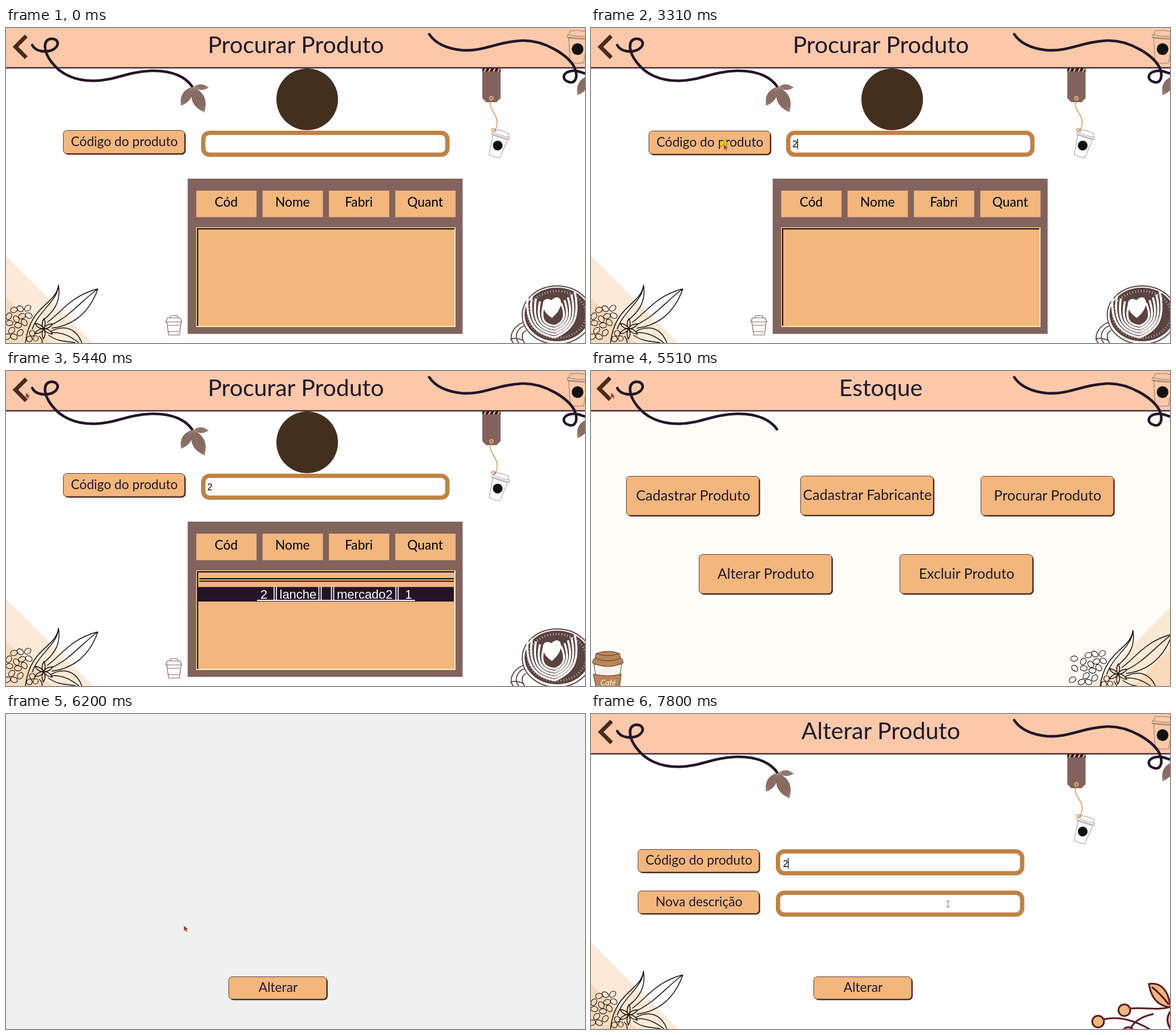
These frames come from a looping animation (1015 px wide and 552 px high, 8 s). An HTML page:

```html
<!DOCTYPE html>
<html lang="pt">
<head>
<meta charset="utf-8">
<title>Procurar Produto</title>
<style>
html, body { margin: 0; width: 100%; height: 100%; overflow: hidden; background: #fff; }
svg { display: block; width: 100%; height: 100%; }
text { font-family: Lato, "Open Sans", sans-serif; fill: #231829; }
.mid { text-anchor: middle; }
.arial, .arial text { font-family: "Liberation Sans", Arial, sans-serif; }
.ink { fill: none; stroke: #231527; stroke-linecap: round; stroke-linejoin: round; }
.thin { fill: none; stroke: #4a3a36; stroke-width: .6; stroke-linejoin: round; }
</style>
</head>
<body>
<svg id="stage" viewBox="0 0 1015 552"></svg>
<script>
const FACE = '#f3b77d', BROWN = '#82635d', DARK = '#4a2c24';
const rect = (x, y, w, h, fill, more = '') =>
  `<rect x="${x}" y="${y}" width="${w}" height="${h}" fill="${fill}" ${more}/>`;
const path = (d, more = '') => `<path d="${d}" ${more}/>`;
const circle = (x, y, r, more = '') => `<circle cx="${x}" cy="${y}" r="${r}" ${more}/>`;
const text = (x, y, size, s, more = 'class="mid"') =>
  `<text x="${x}" y="${y}" font-size="${size}" ${more}>${s}</text>`;
const group = (id, body, more = '') => `<g id="${id}" ${more}>${body}</g>`;

const button = (x, y, w, h, label, size = 22.7, id = '') => group(id,
  rect(x + 2, y + 2, w - 2, h - 2, DARK, 'rx="7"') +
  rect(x + .5, y + .5, w - 2.5, h - 2.5, FACE, `rx="6" stroke="${DARK}" stroke-width=".9"`) +
  text(x + w / 2, y + h / 2 - 1 + size * .33, size, label));
const entry = (x, y) =>
  rect(x + 3.8, y + 3.8, 428, 38.2, '#fff', 'rx="11" stroke="#c08244" stroke-width="7.6"');
const field = (id, more = '') => group(id,
  text(353, 209, 16, '2', `id="${id}Text" style="fill:#000"`) +
  rect(353, 194, 1.3, 18, '#000', `id="${id}Caret"`), 'class="arial" ' + more);

// Paper cup outline around its black round label
const cup = (x, y, scale, turn) =>
  `<g transform="translate(${x} ${y}) rotate(${turn}) scale(${scale})" class="thin">` +
  path('M-17,-20 L-12,24 Q0,27 12,24 L17,-20Z M-20,-20 Q0,-16 20,-20 L19,-25 Q0,-21 -19,-25Z M-17,-25 L-15,-32 Q0,-35 15,-32 L17,-25') +
  circle(0, 0, 10.5, 'fill="#111" stroke="none"') + '</g>';

const leaf = (x, y, len, wide, turn) => {
  let veins = '';
  for (let k = -.7; k < .8; k += .35)
    veins += path(`M0,0 Q${len / 2},${k * wide * 2} ${len},0`, 'fill="none" stroke="#a89088" stroke-width=".6"');
  return `<g transform="translate(${x} ${y}) rotate(${turn})">` +
    path(`M0,0 Q${len * .5},${-wide * 2} ${len},0 Q${len * .5},${wide * 2} 0,0`, 'fill="#80635b"') + veins + '</g>';
};

const beans = [[5, 505], [14, 494], [25, 492], [38, 491], [6, 517], [18, 510], [28, 505], [40, 504], [10, 530],
  [21, 521], [32, 516], [2, 541], [14, 541], [25, 534], [-11, 500], [-10, 517], [-14, 537]];
let petals = '';
for (let i = 0; i < 6; i++)
  petals += path('M0,0 Q8,-6 18,0 Q8,5 0,0', `fill="#f8d8b8" transform="translate(66 527) rotate(${i * 60 - 88})"`);
const plant = '<g fill="none" stroke="#17100f" stroke-width="1.5" stroke-linejoin="round">' +
  beans.map(([x, y], i) =>
    `<ellipse cx="${x}" cy="${y}" rx="6.2" ry="4.6" stroke-width="1.1" transform="rotate(${i * 47 % 120 - 60} ${x} ${y})"/>`).join('') +
  path('M92,450 C88,486 42,484 34,552 M92,450 C96,476 88,494 64,513 M92,450 C92,478 56,496 46,528') +
  path('M161,457 C112,470 98,498 72,516 M161,457 C146,500 116,522 80,526 M161,457 C130,480 112,506 76,522') +
  path('M78,532 C104,518 124,528 133,552 M74,538 C94,552 108,548 122,552 M78,534 C100,532 116,542 128,552 M58,540 Q66,546 62,556') +
  petals + circle(46, 535, 5, 'stroke-width="1.2"') + circle(41, 545, 5, 'stroke-width="1.2"') +
  circle(52, 544, 4.5, 'stroke-width="1.2"') + '</g>';

const header = group('header',
  rect(0, 0, 1015, 70, '#fbc9aa') + rect(0, 68.6, 1015, 2.3, '#3b2230') + cup(1002, 37, .98, 3) +
  path('M35.5,14 L16.5,33 L35.5,52', 'id="back" fill="none" stroke="#4b2a1a" stroke-width="7"') +
  path('M46,30 C52,42 72,44 84,37 C96,28 90,18 78,19 C64,22 66,42 80,60 C95,80 120,93 155,92.5 C190,92 215,76 255,75 C295,74 316,88 326,102', 'class="ink" stroke-width="4.6"') +
  path('M742,11 C752,26 770,36 800,39 C840,41 860,24 905,22 C945,21 985,48 996,68 C1004,86 998,97 988,95 C974,92 975,79 988,76 C998,73 1006,77 1016,80', 'class="ink" stroke-width="4.6"') +
  text(508, 43.5, 41, '', 'class="mid" id="title"'));

let stripes = '';
for (let x = 837; x < 866; x += 8) stripes += path(`M${x},76 l3,-6 h3 l-3,6Z`, `fill="${FACE}"`);
const decor = group('decor',
  leaf(327, 103, 49, 11, 65) + leaf(326, 103, 38, 8, 120) + leaf(329, 103, 26, 5, 3) + leaf(1020, 84, 38, 8, 118) +
  path('M835,70 H867 V123 L860,130 H842 L835,123Z', `fill="${BROWN}"`) + rect(835, 70, 32, 6, '#2a1a1c') + stripes +
  circle(851, 123, 2.8, `fill="${BROWN}" stroke="${FACE}" stroke-width="1.8"`) +
  path('M850,126 C844,142 862,150 861,167 C860,178 855,183 852,180 C849,175 857,174 859,182', 'fill="none" stroke="#c98545" stroke-width="1.3"') +
  cup(862, 206, .81, 17) +
  path('M0,399 L153,552 H0Z', 'fill="#fcead9"') + path('M0,472 L80,552 H0Z', 'fill="#f9dabb"') + plant);

// Latte seen from above
let foam = '';
for (let i = 2; i < 7; i++)
  foam += path(`M${957 - 7 * i},${494 - 5 * i} C${950 - 7 * i},${506 + 2 * i} ${948 - 3 * i},${512 + 4 * i} 962,${512 + 5 * i} C${972 + 4 * i},${510 + 3 * i} ${970 + 6 * i},${500 + i} ${961 + 6 * i},${492 - 5 * i}`,
    'fill="none" stroke="#fff" stroke-width="3.6"');
const latte = '<g fill="none" stroke="#5a4340" stroke-width="1.8">' +
  path('M906,516 C888,524 880,542 890,553 M908,522 C893,528 891,545 900,553 M912,530 C902,534 904,546 910,553 M884,546 Q892,541 908,548') +
  '<ellipse cx="966" cy="503" rx="61" ry="51" fill="#fff"/>' +
  '<ellipse cx="966" cy="502" rx="56" ry="46" fill="#5a4340"/>' +
  '<ellipse cx="966" cy="502" rx="51" ry="41" stroke="#d9cfcc" stroke-width="4" stroke-dasharray="1 4"/></g>' +
  foam + path('M957,508 C932,492 940,467 956,477 C972,461 984,486 957,508Z', 'fill="#fff"');

const smallCup = path('M282,515 H307 L304,538 H285Z M280,515 L283,508 H305 L308,515Z M287,508 L289,504 H300 L302,508 M284,521 H305 M285,532 H303',
  'fill="none" stroke="#80635c" stroke-width="1.2"');

const heads = ['Cód', 'Nome', 'Fabri', 'Quant'].map((s, i) =>
  rect(333.5 + i * 116.3, 285, 105.7, 46.5, FACE) + text(386 + i * 116.3, 313, 22.7, s, 'class="mid" style="fill:#000"')).join('');
const bars = [469.5, 548, 570, 683].map(x => `M${x + .5},378 v24 M${x + 4.5},378 v24`).join(' ');
const results = group('results',
  path('M339,364 H785 M339,368.3 H785', 'stroke="#000" stroke-width="1.8"') +
  rect(337, 378.5, 448, 25.5, '#231429', 'id="picked"') +
  group('row',
    path(bars, 'stroke="currentColor" stroke-width="1.7"') +
    [[446, '2'], [479.5, 'lanche'], [580, 'mercado2'], [699.5, '1']].map(([x, s]) =>
      text(x, 398.5, 22, s, 'style="fill:currentColor"')).join('') +
    path('M440,402 H717', 'id="under" stroke="currentColor" stroke-width="1.8"'), 'class="arial"'));

const find = group('find',
  circle(528, 125, 54, 'fill="#42301f"') +
  button(100, 179, 215, 43, 'Código do produto', 22.7, 'search') + entry(342, 180) + field('code') +
  rect(318.5, 264, 482, 272, BROWN) + heads +
  rect(333, 349, 455, 175, '#fdeeb4') + path('M333,524 V349 H788 L786,351 H335 V522Z', 'fill="#d9ae80"') +
  rect(335, 351, 451, 171, '#1a1010') + rect(337, 353, 449, 169, FACE) + results + smallCup + latte);

const stock = group('stock',
  path('M1015,415 L878,552 H1015Z', 'fill="#fbe9d4"') + path('M1015,487 L950,552 H1015Z', 'fill="#f9dabb"') +
  `<g transform="translate(858 4)">${plant}</g>` +
  button(61.5, 184, 235, 71, 'Cadastrar Produto', 25) + button(367, 183.5, 235, 71, 'Cadastrar Fabricante', 25) +
  button(683, 184, 235, 71, 'Procurar Produto', 25) + button(189, 321, 235, 71, 'Alterar Produto', 25, 'change') +
  button(541, 321, 235, 71, 'Excluir Produto', 25) +
  '<g stroke="#5b3a28" stroke-width="1">' +
  path('M5,514 L12,556 H46 L54,514Z', 'fill="#f7f3ef"') + path('M4,531 Q30,537 53,531 L50,556 H9Z', 'fill="#b98558"') +
  path('M3,512 Q2,506 7,503 L9,495 Q30,487 50,495 L52,503 Q57,506 56,512 Q30,524 3,512Z', 'fill="#b98558"') +
  path('M7,503 Q30,513 52,503 M9,495 Q30,503 50,495', 'fill="none"') + '</g>' +
  text(30, 551, 14, 'Café', 'class="mid" style="fill:#fff;font-style:italic"'));

const twig = '<g fill="none" stroke="#5a1a22" stroke-width="3" stroke-linecap="round">' +
  path('M899,535 C930,528 960,540 985,556 M945,516 C975,514 995,520 1016,513 M985,526 C965,530 950,540 946,552') +
  path('M978,473 C998,470 1012,482 1016,514 C994,512 982,498 978,473Z M984,479 Q1000,492 1012,508', `fill="${FACE}"`) +
  path('M1018,518 Q1004,534 1016,552', `fill="${FACE}"`) +
  [[889, 539], [935, 519], [942, 559]].map(([x, y]) => circle(x, y, 10.3, `fill="${FACE}"`)).join('') + '</g>';
const edit = group('edit',
  button(82, 237, 214.5, 42, 'Código do produto') + entry(324, 237) +
  button(82, 309.5, 214.5, 42, 'Nova descrição') + entry(324, 309.5) +
  field('fresh', 'transform="translate(-16.5 58.5)"') + twig);

const pointer = group('pointer',
  circle(0, 0, 7, 'id="press" fill="#f2d400" fill-opacity=".75"') +
  path('M0,0 V9.5 L2.3,7.5 L4,11 L5.7,10.2 L4.1,6.8 L7.3,6.6Z', 'id="arrow" fill="#a52a2a" stroke="#c9b0a8" stroke-width=".6"') +
  path('M-3,-5 H3 M0,-5 V5 M-3,5 H3', 'id="beam" fill="none" stroke="#b98a8a" stroke-width="1.4"'));

const el = id => document.getElementById(id);
el('stage').innerHTML = rect(0, 0, 1015, 552, '#fff', 'id="paper"') + decor + header + find + stock + edit +
  group('submit', button(390, 460, 174, 41.5, 'Alterar')) + pointer;

// Pointer stops: time, x, y and how far the way there sags
const stops = [[210, 950, 518], [560, 579, 227], [690, 579, 227], [940, 541, 200], [2350, 541, 200],
  [2970, 233, 204, 17], [3380, 233, 204], [4070, 520, 397], [4340, 527, 403], [4480, 527, 403], [4910, 66, 167],
  [5300, 35, 38], [5580, 35, 38], [6040, 306, 360], [6190, 312, 371], [6260, 312, 371], [6400, 297, 327],
  [6800, 350, 258], [6870, 350, 258], [7210, 626, 333]];
const clicks = [950, 3305, 4405, 5365, 6060, 6860];

const show = (id, on) => { el(id).style.display = on ? '' : 'none'; };
const within = (t, a, b) => t >= a && t < b;
const shift = (id, x, y) => el(id).setAttribute('transform', `translate(${x} ${y})`);

function pointerAt(t) {
  const i = stops.findIndex(s => s[0] > t);
  if (i < 1) return (i ? stops[stops.length - 1] : stops[0]).slice(1);
  const [t0, x0, y0] = stops[i - 1], [t1, x1, y1, sag = 0] = stops[i];
  const u = (t - t0) / (t1 - t0), e = u * u * (3 - 2 * u);
  return [x0 + (x1 - x0) * e, y0 + (y1 - y0) * e + sag * Math.sin(Math.PI * e)];
}

function setField(id, t, focus, typed, blur) {
  show(id + 'Text', t >= typed);
  show(id + 'Caret', within(t, focus, blur) && (t - focus) % 900 < 600);
  shift(id + 'Caret', t >= typed ? 8.6 : 0, 0);
}

function draw() {
  const t = performance.now() % 8000;
  const scene = t < 5505 ? 'find' : t < 6195 ? 'stock' : t < 6270 ? 'blank' : 'edit';
  const is = s => scene === s;
  ['find', 'stock', 'edit'].forEach(s => show(s, is(s)));
  show('header', !is('blank'));
  show('decor', is('find') || is('edit'));
  show('submit', is('blank') || is('edit'));
  el('paper').setAttribute('fill', is('blank') ? '#f0f0f0' : is('stock') ? '#fefdf8' : '#fff');
  el('title').textContent = is('find') ? 'Procurar Produto' : is('stock') ? 'Estoque' : 'Alterar Produto';
  const push = within(t, 5365, 5440) ? 1 : 0;
  shift('back', is('stock') ? -2 : is('edit') ? .5 : push, is('stock') ? -2 : is('edit') ? -1.5 : push);

  setField('code', t, 955, 1955, 4405);
  setField('fresh', t, 6865, 7795, 8000);
  const down = within(t, 3305, 3380) ? 1 : 0, chosen = t >= 4405;
  shift('search', down, down);
  const change = within(t, 6060, 6135) ? 1 : 0;
  shift('change', change, change);
  show('results', t >= 3380);
  show('picked', chosen);
  show('under', chosen);
  el('row').style.color = chosen ? '#fff' : '#000';

  const [x, y] = pointerAt(t);
  const overEntry = is('find') ? within(x, 342, 777) && within(y, 180, 226)
    : is('edit') && within(x, 324, 760) && (within(y, 237, 283) || within(y, 310, 356));
  show('pointer', t >= 210);
  shift('pointer', x, y);
  show('arrow', !overEntry);
  show('beam', overEntry);
  show('press', clicks.some(c => within(t, c, c + 75)));
  requestAnimationFrame(draw);
}
draw();
</script>
</body>
</html>
```
